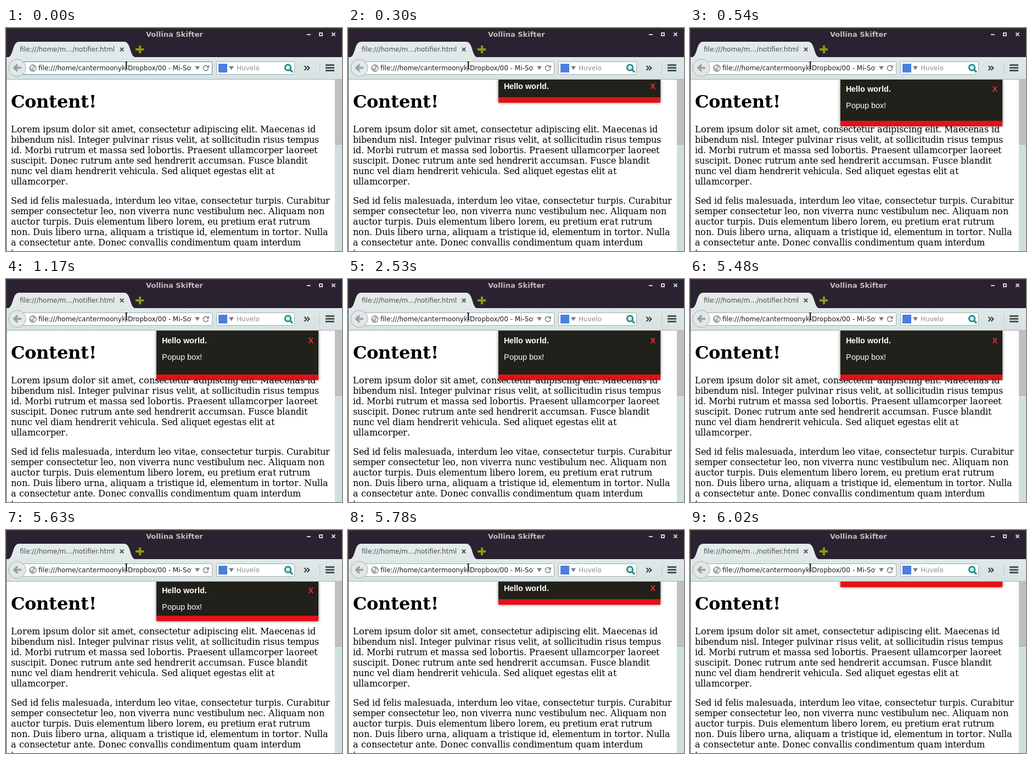
These frames come from a looping animation (612 px wide and 406 px high, 6.05 s). An HTML page with a canvas:

```html
<!DOCTYPE html>
<html lang="la">
<head>
<meta charset="utf-8">
<title>Popup notifier</title>
<style>
  html, body { margin: 0; width: 612px; height: 406px; overflow: hidden; background: #fff; }
  body { position: relative; }
  canvas { position: absolute; left: 0; top: 0; }
  .ui, .page, h1, p { position: absolute; margin: 0; white-space: pre; }
  .ui { font: 12px/14px "DejaVu Sans", sans-serif; color: #1c1c1c; overflow: hidden; }
  .title { left: 255px; top: 4px; font: bold 13px/15px "DejaVu Sans", sans-serif; color: #c3beb9; }
  .tab { left: 25px; top: 32px; color: #4c4f50; }
  .url { left: 59px; top: 66px; width: 279px; }
  .search { left: 420px; top: 66px; color: #8b8e8e; }
  .page { left: 0; top: 94px; width: 599px; height: 312px; overflow: hidden; color: #000; }
  h1 { left: 9px; top: 21px; font: bold 32px/38px "DejaVu Serif", serif; }
  p { left: 9px; font: 16px/19px "DejaVu Serif", serif; }
  .glyph { display: inline-block; white-space: pre; }
  #popup {
    position: absolute; left: 274px; top: 0; width: 295px; overflow: hidden;
    background: #121009; border-bottom: 10px solid #e30006; opacity: .93;
    box-shadow: 0 0 5px rgba(0, 0, 0, .65);
    font: 14.4px/16px "Liberation Sans", Arial, sans-serif; color: #fff;
  }
  #note { position: absolute; left: 0; top: 0; width: 295px; height: 80px; }
  #note > * { position: absolute; left: 10px; top: 10px; white-space: pre; }
  #note .close { left: auto; right: 9px; color: #ee1c23; }
  #note .body { top: 40px; }
</style>
</head>
<body>
<div class="page">
  <h1 class="snap">Content!</h1>
  <p class="snap" style="top:81px">Lorem ipsum dolor sit amet, consectetur adipiscing elit. Maecenas id
bibendum nisl. Integer pulvinar risus velit, at sollicitudin risus tempus
id. Morbi rutrum et massa sed lobortis. Praesent ullamcorper laoreet
suscipit. Donec rutrum ante sed hendrerit accumsan. Fusce blandit
nunc vel diam hendrerit vehicula. Sed aliquet egestas elit at
ullamcorper.</p>
  <p class="snap" style="top:211px">Sed id felis malesuada, interdum leo vitae, consectetur turpis. Curabitur
semper consectetur leo, non viverra nunc vestibulum nec. Aliquam non
auctor turpis. Duis elementum libero lorem, eu pretium erat rutrum
non. Duis libero urna, aliquam a tristique id, elementum in tortor. Nulla
a consectetur ante. Donec convallis condimentum quam interdum
tempus.</p>
  <div id="popup"><div id="note">
    <b class="snap">Hello world.</b><b class="close">X</b><span class="body snap">Popup box!</span>
  </div></div>
</div>
<canvas id="chrome" width="612" height="406"></canvas>
<div class="ui title">Vollina Skifter</div>
<div class="ui tab">file:///home/m…/notifier.html</div>
<div class="ui url">file:///home/cantermoonyk/Dropbox/00 - Mi-Sof</div>
<div class="ui search">Huvelo</div>
<canvas id="pointer" width="612" height="406"></canvas>

<script>
const LOOP = 6050, STEP = 30, SLIDE = 600;
const OPEN = { from: 60, start: 37 }, CLOSE = { from: 5510, start: 5442 };
const FULL = 80, PAD = 10;

const popup = document.getElementById('popup');
const note = document.getElementById('note');
const g = document.getElementById('chrome').getContext('2d');

// Whole-pixel advances, as in hinted desktop text.
function snapText(el) {
  const text = el.textContent;
  g.font = getComputedStyle(el).font;
  el.textContent = '';
  for (const ch of text) {
    if (ch === '\n') { el.append(ch); continue; }
    const glyph = document.createElement('span');
    glyph.className = 'glyph';
    glyph.textContent = ch;
    glyph.style.width = Math.round(g.measureText(ch).width) + 'px';
    el.append(glyph);
  }
}

function rect(x, y, w, h, color) {
  g.fillStyle = color;
  g.fillRect(x, y, w, h);
}

function stroke(color, width, ...points) {
  g.strokeStyle = color;
  g.lineWidth = width;
  g.beginPath();
  points.forEach(([x, y], i) => i ? g.lineTo(x, y) : g.moveTo(x, y));
  g.stroke();
}

function fillPoly(color, ...points) {
  g.fillStyle = color;
  g.beginPath();
  points.forEach(([x, y]) => g.lineTo(x, y));
  g.fill();
}

function ring(x, y, r, color, width, fill, a = 0, b = 2 * Math.PI) {
  g.beginPath();
  g.arc(x, y, r, a, b);
  if (fill) { g.fillStyle = fill; g.fill(); }
  g.strokeStyle = color;
  g.lineWidth = width;
  g.stroke();
}

function cross(x, y, r, color, width) {
  stroke(color, width, [x - r, y - r], [x + r, y + r]);
  stroke(color, width, [x + r, y - r], [x - r, y + r]);
}

function shade(y0, y1, from, to) {
  const fill = g.createLinearGradient(0, y0, 0, y1);
  fill.addColorStop(0, from);
  fill.addColorStop(1, to);
  return fill;
}

function field(x, y, w, h, border) {
  g.beginPath();
  g.roundRect(x + .5, y + .5, w - 1, h - 1, 2);
  g.fillStyle = '#fff';
  g.fill();
  g.strokeStyle = border;
  g.lineWidth = 1;
  g.stroke();
}

function drawTitleBar() {
  rect(0, 0, 612, 54, '#2b2231');
  rect(0, 0, 612, 1, '#48443f');
  const pale = '#d6d1cb';
  rect(548, 11, 7, 2, pale);
  g.strokeStyle = pale;
  g.lineWidth = 2;
  g.strokeRect(571, 9, 5, 5);
  cross(596.5, 11.5, 3, pale, 2);
}

function drawTab() {
  g.fillStyle = shade(25, 54, '#e5ebeb', '#dfe8e8');
  g.beginPath();
  g.moveTo(1, 54);
  g.bezierCurveTo(15, 54, 10, 25, 24, 25);
  g.lineTo(215, 25);
  g.bezierCurveTo(229, 25, 224, 54, 238, 54);
  g.fill();
  cross(211, 39, 3.2, '#55595a', 2);
  rect(236, 37, 15, 4, '#8a9a10');
  rect(242, 32, 4, 14, '#8a9a10');
}

function drawToolbar(focused) {
  rect(0, 53, 612, 40, shade(53, 93, '#dfe8e8', '#d7e2e2'));
  rect(0, 93, 612, 1, '#a9b0b0');

  field(22, 61, 354, 24, focused ? '#4d86ac' : '#a4abab');
  ring(20.5, 72.5, 15.5, '#a5acac', 1, '#e2e8e8');
  stroke('#9a9fa0', 3.6, [21, 66.5], [15, 72.5], [21, 78.5]);
  stroke('#9a9fa0', 3.6, [15, 72.5], [28, 72.5]);

  // Globe
  ring(49, 73, 6.3, '#8e9394', 1, '#a6abac');
  fillPoly('#eef1f1', [45, 70], [48, 68], [50, 71], [47, 74], [45, 73]);
  fillPoly('#eef1f1', [51, 72], [54, 71], [54, 75], [51, 78], [50, 75]);

  fillPoly('#7b8081', [344, 69.5], [353, 69.5], [348.5, 76.5]);
  ring(364, 73, 4.6, '#85898a', 1.8, null, .3, 5.5);
  fillPoly('#85898a', [370, 67], [370, 72.5], [364.5, 72.5]);

  field(383, 61, 143, 24, '#a4abab');
  rect(387, 65, 16, 16, '#4a7fe0');
  fillPoly('#777c7d', [406, 69.5], [415, 69.5], [410.5, 76.5]);
  stroke('#28908f', 3.4, [517, 75.5], [522, 80.5]);
  ring(513.5, 72, 5.2, '#28908f', 3, '#d3eeee');

  for (const x of [543.5, 548.5]) {
    stroke('#333738', 2, [x, 69], [x + 4, 73], [x, 77]);
  }
  rect(571, 62, 1, 22, '#c0caca');
  for (const y of [66, 71, 76]) rect(582, y, 16, 3, '#4b4f50');
}

function drawFrame() {
  rect(599, 94, 13, 312, '#cddfdf');
  rect(599, 94, 13, 118, '#bfc0bf');
  rect(599, 211, 13, 1, '#a0a5a5');
  rect(0, 0, 1, 406, '#48443f');
}

function drawChrome(focused) {
  g.clearRect(0, 0, 612, 406);
  drawTitleBar();
  drawTab();
  drawToolbar(focused);
  drawFrame();
}

function drawPointer() {
  const c = document.getElementById('pointer').getContext('2d');
  for (const [color, grow] of [['#fff', 1], ['#111', 0]]) {
    c.fillStyle = color;
    for (const [x, y, w, h] of [[218, 62, 2, 12], [216, 61, 6, 1], [216, 74, 6, 1]]) {
      c.fillRect(x - grow, y - grow, w + 2 * grow, h + 2 * grow);
    }
  }
}

function swing(t, phase) {
  const tick = phase.from + Math.floor((t - phase.from) / STEP) * STEP;
  const p = Math.min(1, Math.max(0, (tick - phase.start) / SLIDE));
  return .5 - Math.cos(p * Math.PI) / 2;
}

function openness(t) {
  return t < CLOSE.from ? swing(t, OPEN) : 1 - swing(t, CLOSE);
}

let wasFocused = null;

function render(now) {
  const t = now % LOOP;
  const focused = t < OPEN.from;
  if (focused !== wasFocused) drawChrome(wasFocused = focused);

  const k = openness(t);
  popup.style.display = focused ? 'none' : 'block';
  popup.style.height = Math.round(FULL * k) + 'px';
  note.style.top = -Math.round(PAD * (1 - k)) + 'px';
  requestAnimationFrame(render);
}

document.querySelectorAll('.snap').forEach(snapText);
drawPointer();
render(performance.now());
</script>
</body>
</html>
```
